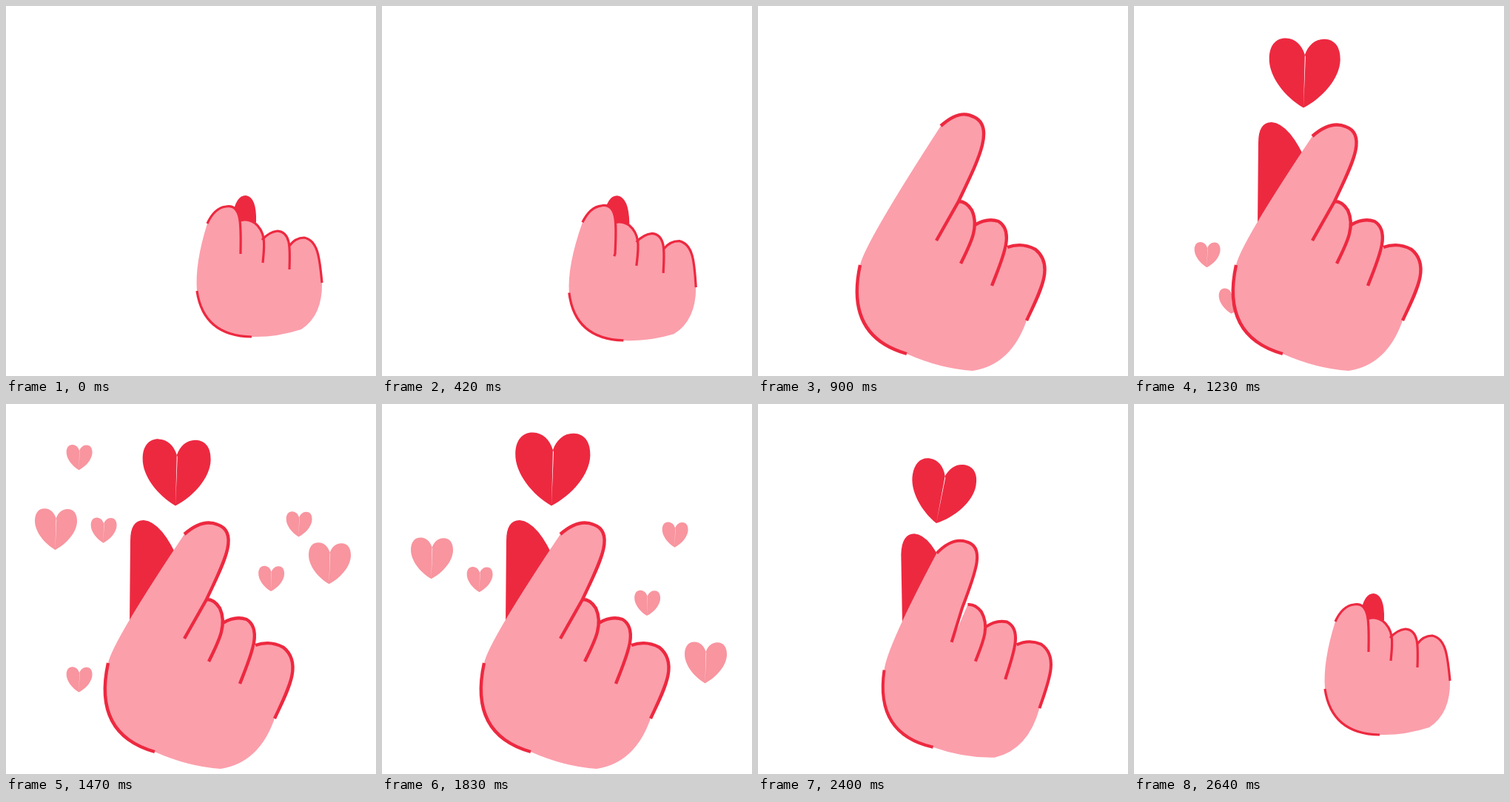
An HTML page that plays this animation: 500x500 px, repeating every 2700 ms.

```html
<!DOCTYPE html>
<html lang="en">
<head>
<meta charset="utf-8">
<title>Finger heart</title>
<style>
html, body { margin: 0; width: 100%; height: 100%; overflow: hidden; background: #fff; }
svg { display: block; width: 100vw; height: 100vh; }
</style>
</head>
<body>
<svg viewBox="0 0 500 500">
  <g id="rain" fill="#f8959f"></g>
  <path id="heart" fill="#ed2940"/>
  <path id="thumb" fill="#ed2940"/>
  <path id="skin" fill="#fb9fab"/>
  <path id="lines" fill="none" stroke="#ed2940"/>
</svg>
<script>
const LOOP = 2700, STEP = 30, FLOOR = 428;
const $ = id => document.getElementById(id);

// Key points as x, y pairs. Fingers: start, shoulder, end.
// Thumb: foot, then two arcs. The rest: ends and control points of arcs.
const fist = {
  index: [272,294, 297,271, 317,334, 317,335],
  middle: [317,290, 336,293, 347,347],
  ring: [346,316, 367,304, 383,356],
  pinky: [383,324, 403,313, 427,374],
  palm: [428,418, 399,437, 365,448],
  wrist: [258,385, 267,446, 332,447],
  side: [255,348],
  thumb: [320,300, 306,285, 310,256, 324,256, 339,258, 338,292]
};
const open = {
  index: [241,176, 286,163, 271,264, 241,317],
  middle: [271,264, 289,276, 274,348],
  ring: [293,296, 325,291, 316,378],
  pinky: [337,326, 375,329, 363,425],
  palm: [342,485, 290,493, 246,490],
  wrist: [138,350, 117,446, 201,470],
  side: [144,321],
  thumb: [167,300, 168,185, 168,157, 186,157, 211,159, 235,215]
};
const straightIndex = [247,162, 292,150, 271,264, 241,317];

// Columns of rising hearts: x, scale, speed in px/ms, first start, gap to the second
const columns = [
  [66.5, .62, 1.35, 1299, 389], [436.5, .62, 1.1, 1302, 482],
  [98.5, .38, 1.1, 1162, 273], [131.5, .38, .95, 1217, 430],
  [395.5, .38, 1.1, 1244, 373], [358, .38, 1.1, 1311, 390]
];

const half = s => `M0,0C${-24 * s},-13 ${-46 * s},-39 ${-46 * s},-63` +
  `C${-46 * s},-80 ${-38 * s},-89.5 ${-25 * s},-89.5C${-13 * s},-89.5 ${-4 * s},-81 0,-68.5Z`;
const HEART = half(1) + half(-1) + "M0,0L-1,-66L0,-68.5L1,-66Z";
$("heart").setAttribute("d", HEART);

const drops = columns.flatMap(([x, scale, speed, first, gap]) => [first, first + gap].map(from => {
  const el = document.createElementNS("http://www.w3.org/2000/svg", "path");
  el.setAttribute("d", HEART);
  $("rain").append(el);
  return { el, x, scale, speed, from };
}));

const clamp = u => Math.max(0, Math.min(1, u));
const smooth = (t, from, span) => {
  const u = clamp((t - from) / span);
  return u * u * (3 - 2 * u);
};
const mix = (a, b, k) => a.map((v, i) => v + (b[i] - v) * k);
const shift = (a, dx, dy) => a.map((v, i) => v + (i % 2 ? dy : dx));

// A rounded finger: controls are spanned by start-to-shoulder (u) and shoulder-to-end (v).
function finger(cmd, a, round = .07) {
  const [s, m, e, tail] = [0, 2, 4, 6].map(i => a.slice(i, i + 2));
  const at = (p, u, v) => p.map((c, i) => c + u * (m[i] - s[i]) + v * (e[i] - m[i]));
  return `${cmd}${s}C${at(s, .4, -round)} ${at(m, -.28, -.7 * round)} ${m}` +
    `C${at(m, .75, .2)} ${at(e, .35, -.42)} ${e}` + (tail.length ? "L" + tail : "");
}

function place(el, x, y, scale, turn = 0) {
  el.style.display = scale > 0 ? "" : "none";
  el.setAttribute("transform", `translate(${x} ${y}) rotate(${turn + 1.5}) scale(${Math.max(scale, .001)})`);
}

function drawHand(t, back) {
  const rise = t < 420 ? 0 : smooth(t, 360, 480);
  const k = rise * (1 - back);
  const bend = smooth(t, 930, 210);
  const dip = back ? 0 : 110 * k * (1 - k) ** 4;
  const h = {};
  for (const part in fist) {
    const to = part === "index" ? mix(straightIndex, open.index, bend) : open[part];
    h[part] = shift(mix(fist[part], to, k), 0, dip);
  }
  // the index trails behind while the hand closes
  const trail = shift(h.index.slice(0, 6), -40 * back * (1 - back), -440 * back ** 3 * (1 - back));
  h.index = trail.concat(h.index.slice(6));

  const fingers = cmd => finger("M", h.index, .12) +
    ["middle", "ring", "pinky"].map(part => finger(cmd, h[part])).join("");
  const [wx, wy, cx, cy, ex, ey] = h.wrist;
  $("skin").setAttribute("d", fingers("L") + `Q${h.palm.join(" ")} ${ex} ${ey}` +
    `Q${cx},${cy} ${wx},${wy}Q${h.side} ${h.index.slice(0, 2)}Z`
    .replace(/^/, "").trim());
  $("lines").setAttribute("d", fingers("M") + `M${wx},${wy}Q${cx},${cy} ${ex},${ey}`);
  $("lines").setAttribute("stroke-width", 3.2 + 1.2 * k);

  const hidden = shift(open.thumb, 50, 84);
  const th = back ? mix(open.thumb, fist.thumb, back ** 1.3)
    : t < 940 ? shift(mix(fist.thumb, hidden, clamp(rise * 1.6)), 0, dip / 3)
    : mix(hidden, open.thumb, smooth(t, 940, 200));
  $("thumb").setAttribute("d", `M${th.slice(0, 2)}L${th.slice(2, 4)}Q${th.slice(4)}Z`);
}

function drawHearts(t, back) {
  const pop = smooth(t, 1110, 130);
  const beat = 1.06 + .08 * Math.sin((t - 1470) * .00964 - .848);
  place($("heart"), 229 + 44 * back, 137.5 + 87 * back, pop * beat * (1 - 2.3 * back * back), 33 * back);

  for (const { el, x, scale, speed, from } of drops) {
    const y = FLOOR - speed * (t - from);
    place(el, x, y, t < 2040 && y <= FLOOR && y > 0 ? scale : 0);
  }
}

function render(time) {
  const t = Math.floor((time % LOOP) / STEP) * STEP;
  const back = smooth(t, 2275, 365);
  drawHand(t, back);
  drawHearts(t, back);
}

const start = performance.now();
function tick() {
  render(performance.now() - start);
  requestAnimationFrame(tick);
}
tick();
</script>
</body>
</html>
```
